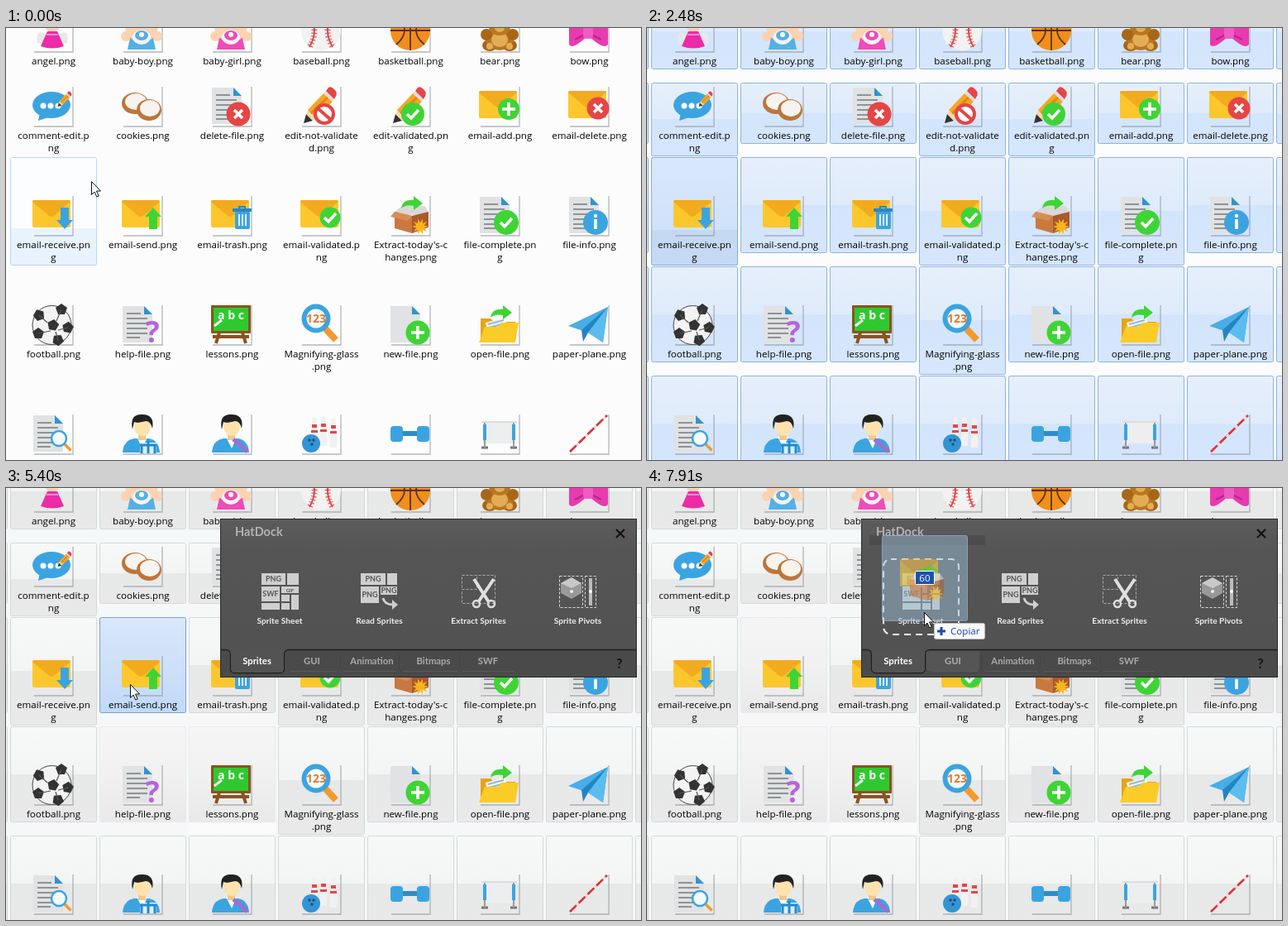
Recreate the animation shown at these times as an HTML page. Size 768 by 522 pixels, loop 8000 ms.

```html
<!DOCTYPE html>
<html lang="es">
<head>
<meta charset="utf-8">
<title>Sprite selection</title>
<style>
  html, body { margin: 0; width: 100%; height: 100%; overflow: hidden; background: #fcfcfc; }
  svg { display: block; width: 768px; height: 522px; }
  .label { font: 11.6px "Open Sans", "Noto Sans", sans-serif; text-anchor: middle; fill: #000; }
  .tip { font: 11.6px "Open Sans", "Noto Sans", sans-serif; fill: #575757; }
  .ui { font: 700 10.2px Lato, sans-serif; text-anchor: middle; fill: #eee; }
  .tab { font-size: 11.3px; fill: #aaa; }
  .chip { font: 700 9px Lato, sans-serif; text-anchor: middle; fill: #555; }
  .mark { font: 700 14px "Open Sans", sans-serif; text-anchor: middle; }
</style>
</head>
<body>
<svg id="stage" viewBox="0 0 768 522"></svg>
<script>
const LOOP = 8000;
const COLS = [0, 1, 2, 3, 4, 5, 6];
const BLUE = '#3ba4e0', GREEN = '#3fd435', RED = '#e64545', GREY = '#cfcfcf';

// Markup helpers
const fill = (d, color, extra = '') => `<path d="${d}" fill="${color}" ${extra}/>`;
const line = (d, color, w = 1, extra = '') =>
  `<path d="${d}" fill="none" stroke="${color}" stroke-width="${w}" ${extra}/>`;
const box = (x, y, w, h, color, r = 0, extra = '') =>
  `<rect x="${x}" y="${y}" width="${w}" height="${h}" rx="${r}" fill="${color}" ${extra}/>`;
const oval = (x, y, rx, color, ry = rx, extra = '') =>
  `<ellipse cx="${x}" cy="${y}" rx="${rx}" ry="${ry}" fill="${color}" ${extra}/>`;
const text = (x, y, str, cls, extra = '') => `<text x="${x}" y="${y}" class="${cls}" ${extra}>${str}</text>`;
const group = (x, y, body, extra = '', scale = 1) =>
  `<g transform="translate(${x} ${y}) scale(${scale})" ${extra}>${body}</g>`;
const during = (spans, body) => `<g data-t="${spans}">${body}</g>`;
const gradient = (id, ...stops) => `<linearGradient id="${id}" x2="0" y2="1">` +
  stops.map(([at, c]) => `<stop offset="${at}" stop-color="${c}"/>`).join('') + '</linearGradient>';

// Icon parts
const badge = (x, y, r, color, mark) => group(x, y, oval(0, 0, r, color) + line(mark, '#fff', 3.6));
const CHECK = 'M-7 0L-2 5L7-5', CROSS = 'M-5-5L5 5M5-5L-5 5', PLUS = 'M-8 0H8M0-8V8';
const page = fill('M1 2H27L37 12V46H1Z', '#e0e2e3') + fill('M27 2L37 12H27Z', '#3093cf');
const doc = page + line('M6 11H23M6 17H31M6 23H31M6 29H31M6 35H31M6 40H22', '#8f9395', 2);
const mail = box(0, 6, 46, 33, '#fcc72c', 2) +
  fill('M0 8Q0 6 2 6H44Q46 6 46 8L27 24Q23 28 19 24Z', '#f2ab1f');
const pencil = fill('M4 45L7 34L15 42Z', '#333') + fill('M7 34L10 28L20 38L15 42Z', '#f7d7a8') +
  fill('M9 29L28 9L39 19L19 39Z', '#f6a623') + line('M13 33L33 14', '#e0851a', 3) +
  fill('M28 9L31 6L41 16L39 19Z', '#ddd') + fill('M31 6L34 2Q37 0 41 4Q46 9 42 14L41 16Z', RED);
const arrow = (x, y, color, turn) => group(x, y,
  fill('M-5-13H5V2H10L0 13L-10 2H-5Z', color, `transform="rotate(${turn})"`));
const curvedArrow = fill('M14 16Q16 4 29 6V1L40 10L29 18V13Q19 11 14 16Z', GREEN);
const burst = color => fill(Array.from({ length: 20 }, (_, i) => {
  const r = i % 2 ? 5 : 10, a = i * Math.PI / 10;
  return (i ? 'L' : 'M') + (r * Math.cos(a)).toFixed(1) + ' ' + (r * Math.sin(a)).toFixed(1);
}).join('') + 'Z', color);
const crate = fill('M6 20L15 13H42L47 20L42 24H8Z', '#d8d8d8') + fill('M6 20L27 25V46L6 40Z', '#c9783f') +
  fill('M27 25L47 20V39L27 46Z', '#a95b2b') + fill('M6 20L1 26L22 31L27 25Z', '#d98d55') +
  curvedArrow + group(37, 38, burst('#fbb51c'));
const lens = (x, y, r) => line(`M${x + r * .7} ${y + r * .7}l${r * .9} ${r * .9}`, '#f29a2e', r * .4) +
  oval(x, y, r, '#f4fbff', r, `stroke="${BLUE}" stroke-width="${r * .28}"`);
const baby = color => oval(5, 30, 6, '#fbd3b2') + oval(43, 30, 6, '#fbd3b2') +
  fill('M10 32H38L41 46H7Z', color) + oval(24, 17, 20, '#fbd3b2') +
  oval(24, 31, 11, '#f4f4f4', 9) + oval(24, 29, 8, color, 6) + oval(24, 28, 3, '#fff');
const person = fill('M1 47Q2 32 15 30H33Q45 32 46 47Z', BLUE) + fill('M18 28H31L25 42Z', '#fff') +
  box(20, 23, 9, 9, '#edc98d') + oval(25, 15, 10, '#fde2ae', 12) +
  fill('M13 19Q9 0 25 1Q40 1 37 18Q35 9 29 9Q18 12 15 10Z', '#222');
const pin = (x, y) => group(x, y, fill('M-3 0Q0-4 3 0Q3 7 2 11Q6 23 4 34H-4Q-6 23-2 11Q-3 7-3 0Z', '#f1f1f1') +
  box(-3, 7, 6, 4, RED) + box(-4, 14, 8, 3, RED));
const patch = (x, y, a) => fill('M0-7L7-2L4 6H-4L-7-2Z', '#333', `transform="translate(${x} ${y}) rotate(${a})"`);

const icons = [
  [
    fill('M17 28Q3 20 6 38L17 40M31 28Q45 20 42 38L31 40', '#e8e8e8') + oval(24, 16, 9, '#fbd3b2') +
      fill('M18 24H30L38 42Q24 47 10 42Z', '#ec2ba6') + line('M17 28H31', '#f58bd0', 2),
    baby('#55b0e4'),
    baby('#ee4cb8'),
    oval(25, 23, 24, '#f2f2f2') + line('M11 3Q23 23 11 43M39 3Q27 23 39 43', RED, 2) +
      line('M11 3Q23 23 11 43M39 3Q27 23 39 43', RED, 7, 'stroke-dasharray="1 3"'),
    oval(25, 23, 24, '#f18e1c') + line('M25 0V47M1 23H49M8 6Q28 23 8 40M42 6Q22 23 42 40', '#5a3310', 1.8),
    oval(13, 41, 9, '#a76717', 7) + oval(37, 41, 9, '#a76717', 7) + oval(25, 32, 17, '#b9771f', 15) +
      oval(25, 34, 10, '#e3ad55', 9) + oval(9, 28, 7, '#a76717') + oval(41, 28, 7, '#a76717') +
      oval(25, 15, 14, '#b9771f') + oval(25, 20, 6, '#e3ad55', 5) +
      oval(13, 42, 4, '#e3ad55') + oval(37, 42, 4, '#e3ad55'),
    fill('M24 24Q6 8 1 12V40Q5 47 24 29Q43 47 48 40V12Q42 8 24 24Z', '#e83bb0') +
      line('M8 34L20 28M40 34L28 28', '#bd2389', 2) + box(18, 18, 12, 15, '#f25ac4', 4)
  ],
  [
    oval(23, 23, 23, BLUE, 16) + fill('M9 32L7 42L22 37Z', BLUE) +
      [13, 22, 31].map(x => oval(x, 24, 3.5, '#fff')).join('') + group(29, 6, pencil, '', .42),
    oval(16, 21, 16, '#bd753c', 13) + oval(17, 19, 13, '#f7f4ef', 10) +
      oval(33, 29, 15, '#bd753c', 13) + oval(34, 27, 12, '#f7f4ef', 10),
    doc + badge(33, 34, 14.5, RED, CROSS),
    pencil + oval(29, 34, 11, '#fff', 11, `stroke="${RED}" stroke-width="4"`) + line('M21 27L37 41', RED, 4),
    pencil + badge(28, 34, 14, GREEN, CHECK),
    mail + badge(36, 28, 13, GREEN, PLUS),
    mail + badge(36, 27, 13.5, RED, CROSS)
  ],
  [
    mail + arrow(39, 28, BLUE, 0),
    mail + arrow(38, 28, GREEN, 180),
    mail + box(29, 19, 18, 22, BLUE, 2) + box(26, 16, 23, 4, '#2588c9', 1) +
      line('M34 16V14H41V16', '#2588c9', 2) + line('M34 23V37M38 23V37M42 23V37', '#e4f4ff', 2),
    mail + badge(36, 27, 12.5, GREEN, CHECK),
    crate,
    doc + badge(33, 33, 15, GREEN, CHECK),
    doc + oval(33, 33, 15, BLUE) + oval(33, 25, 2.2, '#fff') + line('M33 29V41', '#fff', 3.6)
  ],
  [
    oval(23.5, 25, 23.5, '#f3f3f3', 23.5, 'stroke="#444"') +
      patch(25, 25, 10) + patch(8, 13, 50) + patch(35, 6, 0) + patch(43, 28, 80) + patch(31, 43, 30) + patch(7, 35, 0) +
      line('M18 22L8 13M29 20L35 6M31 31L43 28M22 32L7 35M28 33L31 43', '#555', 1.2),
    doc + text(37, 46, '?', 'mark', 'style="font-size:36px" fill="#b565d8"'),
    line('M10 34L6 47M38 34L42 47M2 39H46', '#8a5320', 4) + box(0, 1, 48, 34, '#8a5320', 1) +
      box(3, 4, 42, 28, '#2fc92f') + text(24, 18, 'a b c', 'mark', 'fill="#fff"') +
      line('M4 26L13 19', '#f4f4f4', 3),
    line('M30 29L43 43', '#f29a2e', 8) + oval(19, 17, 14.5, '#f4fbff', 14.5, `stroke="${BLUE}" stroke-width="6"`) +
      text(19, 22, '123', 'mark', 'fill="#e8792b"'),
    page + badge(34, 34, 14.5, GREEN, PLUS),
    fill('M2 17H14L18 21H44V45H2Z', '#e4a41b') + fill('M8 22L32 16L36 36L12 42Z', '#f6f6f6') +
      line('M11 24L30 19M12 28L31 23', '#8fb8d8', 2) + fill('M0 46L7 27H23L27 22H48L44 46Z', '#fbcb27') +
      curvedArrow,
    fill('M0 26L48 3L42 46L24 34Z', '#48aee8') + fill('M48 3L16 31L18 45L24 34Z', '#2485c3') +
      fill('M48 3L24 34L42 46Z', '#5bbcf0')
  ],
  [
    doc + lens(32, 30, 9),
    person + box(22, 35, 20, 13, '#d9f0ff') + line('M32 33V48M22 38H42M24 39V48M40 39V48', '#238acb', 3),
    person + line('M27 31L44 46', '#a56bd0', 5),
    pin(17, 6) + pin(28, 5) + pin(40, 7) + oval(13, 36, 11, '#3394d4') +
      oval(11, 32, 1.7, '#174e79') + oval(16, 32, 1.7, '#174e79') + oval(14, 37, 1.7, '#174e79'),
    box(10, 21, 28, 6, '#2c8dca') + box(1, 15, 15, 19, BLUE, 4) + box(33, 15, 15, 19, BLUE, 4),
    box(5, 11, 38, 25, '#eceeef') + line('M3 41H11M38 41H46', '#777', 3) +
      line('M7 11V41M42 11V41', '#999', 2) + line('M7 13V32M42 13V32', BLUE, 4) + line('M3 10H46', '#ddd', 2),
    line('M2 46L47 2', '#e4dada', 2.6) + line('M2 46L47 2', '#dc3434', 2.6, 'stroke-dasharray="11 4"')
  ]
];

const labels = [
  'angel.png,baby-boy.png,baby-girl.png,baseball.png,basketball.png,bear.png,bow.png',
  'comment-edit.p|ng,cookies.png,delete-file.png,edit-not-validate|d.png,edit-validated.pn|g,email-add.png,email-delete.png',
  'email-receive.pn|g,email-send.png,email-trash.png,email-validated.p|ng,Extract-today\'s-c|hanges.png,file-complete.pn|g,file-info.png',
  'football.png,help-file.png,lessons.png,Magnifying-glass|.png,new-file.png,open-file.png,paper-plane.png',
  'task-file.png,User-bill.png,User-bill.png,Sports-bowling,Sports-dumbbell,Sports-hurdles,Sports-javelin'
].map(row => row.split(',').map(name => name.split('|')));
const iconTops = [-20, 70, 202, 334, 466];
const cellTops = [-41, 67, 157, 289, 421];

function cell(col, row, paint, stroke, extra = '') {
  const lines = (labels[row][col] || ['']).length;
  const top = cellTops[row] - .5, bottom = iconTops[row] + 54.5 + 15 * lines;
  return box(5.5 + 108 * col, top, 104, bottom - top, paint, 2, `stroke="${stroke}" ${extra}`);
}
const allCells = (paint, stroke) =>
  cellTops.map((_, row) => [-1, ...COLS, 7].map(col => cell(col, row, paint, stroke)).join('')).join('');
const files = icons.map((row, r) => row.map((icon, c) => {
  const x = 32 + 108 * c, y = iconTops[r];
  return group(x, y, line('M2 49H49V1', '#8d9299', 1.3, 'opacity=".65"') + icon) +
    labels[r][c].map((part, i) => text(x + 25.5, y + 64 + 15 * i, part, 'label')).join('');
}).join('')).join('');

const defs = '<defs>' +
  gradient('hover', [0, '#fcfdff'], [.66, '#fafcff'], [.66, '#e9f3fd'], [1, '#e9f3fd']) +
  gradient('glow', [0, '#fbfdff'], [.38, '#f7fafe'], [.38, '#edf5fd'], [1, '#e9f3fd']) +
  gradient('active', [0, '#d9e7f8'], [.45, '#cfe1f8'], [1, '#c0daf9']) +
  gradient('blue', [0, '#e6effb'], [.5, '#dfebfb'], [.5, '#d3e5fc'], [1, '#d5e6fd']) +
  gradient('focus', [0, '#d9e8fc'], [.67, '#cfe2fb'], [.67, '#c4d8f2'], [1, '#c6daf5']) +
  gradient('grey', [0, '#f7f8f8'], [.5, '#f3f4f4'], [.5, '#e7e8e8'], [1, '#e9e9e9']) +
  gradient('faded', [0, '#f5f5f5'], [.5, '#f1f1f1'], [1, '#e9e9e9']) +
  gradient('tipFill', [0, '#fff'], [1, '#e4e5f0']) +
  gradient('panel', [0, '#5c5c5c'], [.2, '#555'], [1, '#515151']) + '</defs>';

const hot = (col, row) => cell(col, row, 'url(#active)', '#7da2ce');
const faded = (col, row) => cell(col, row, 'url(#faded)', '#e9eaea');
const sendHover = opacity => cell(1, 2, 'url(#glow)', '#b8d6fb', `opacity="${opacity}"`);
const highlights =
  during('0-150', cell(0, 2, 'url(#hover)', '#b8d6fb')) +
  during('150-1940', hot(0, 2)) +
  during('420-550', sendHover(.4)) + during('550-680', sendHover(.7)) + during('680-1940', sendHover(1)) +
  during('1940-4200', cell(0, 2, 'url(#focus)', '#84acdd')) +
  during('4770-8000', faded(2, 3) + box(221, 405, 105, 13, '#fbfbfb')) +
  during('5160-8000', faded(1, 3)) + during('5670-8000', faded(1, 2)) +
  during('1940-2330 5160-5670', hot(1, 2)) +
  during('2330-2480 4770-5160', hot(1, 3)) + during('4650-4770', hot(2, 3));

const tooltip = opacity => `<g opacity="${opacity}">` + box(152, 251, 179, 50, '#000', 3, 'opacity=".3"') +
  box(149.5, 248.5, 178, 49, 'url(#tipFill)', 2, 'stroke="#767676"') +
  ['Tipo de elemento: Imagen PNG', 'Dimensiones: 48 x 48', 'Tamaño: 1,58 KB']
    .map((s, i) => text(155, 262 + 15 * i, s, 'tip')).join('') + '</g>';

const chip = (x, y, w, h, str = '') => box(x, y, w, h, GREY) +
  (str && text(x + w / 2, y + h / 2 + 3.3, str, 'chip', h < 9 ? 'style="font-size:6px"' : ''));
const dashes = 'stroke-dasharray="3 2"';
const tools =
  chip(309, 103, 29, 14, 'PNG') + chip(340, 103, 14, 14) + chip(309, 119, 22, 18, 'SWF') +
  chip(333, 119, 21, 8, 'GIF') + chip(309, 139, 22, 8) + chip(333, 129, 10, 8) + chip(345, 129, 9, 18) + chip(333, 139, 10, 8) +
  chip(429, 103, 30, 14, 'PNG') + chip(461, 103, 12, 14) + chip(429, 119, 22, 20, 'PNG') + chip(453, 119, 20, 10, 'PNG') +
  line('M456 133Q458 141 468 141', GREY, 3) + fill('M467 135L474 141L467 147Z', GREY) +
  line('M551.5 105.5H569.5V122.5H551.5ZM571.5 105.5H591.5V139.5H551.5V124', '#aaa', 1, dashes) +
  line('M566 110L584 138M590 110L571 138', '#e0e0e0', 4) +
  oval(569, 140, 4, 'none', 4, 'stroke="#ddd" stroke-width="2.5"') + oval(587, 140, 4, 'none', 4, 'stroke="#ddd" stroke-width="2.5"') +
  line('M669.5 106.5H697.5V144.5H669.5ZM700.5 106.5H713.5V144.5H700.5Z', '#ddd', 1, dashes) +
  fill('M671 115L684 108L696 115V127L684 134L671 127Z', '#999') + fill('M671 115L684 108L696 115L684 121Z', '#c8c8c8') +
  oval(684, 125, 2, '#eee') + line('M707 109V142', '#bbb', 4) + oval(707, 125, 2, '#fff');
const panel =
  box(259.5, 37.5, 503, 191, 'url(#panel)', 0, 'stroke="#2b2b2b"') + box(260, 195, 502, 33, '#4a4a4a') +
  line('M260 195.5H266Q271.5 195.5 271.5 201V218Q271.5 223.5 277 223.5H331Q336.5 223.5 336.5 218V201Q336.5 195.5 342 195.5H762', '#1f1f1f', 1.3) +
  fill('M267 195Q272 195 272 201V218Q272 223 277 223H331Q336 223 336 218V201Q336 195 341 195Z', '#535353') +
  line('M344 221.5H400M408 221.5H472M480 221.5H546M552 221.5H614', '#5a5a5a') +
  line('M404.5 200V219M475.5 200V219M548.5 200V219', '#444') +
  text(277, 58, 'HatDock', 'ui', 'style="font-size:14.5px;text-anchor:start;fill:#b3b3b3"') +
  line('M738 50L748 60M748 50L738 60', '#111', 2.2) +
  text(742, 218, '?', 'ui', 'style="font-size:17px;fill:#151515"') +
  ['Sprite Sheet', 'Read Sprites', 'Extract Sprites', 'Sprite Pivots']
    .map((s, i) => text(331 + 120 * i + (i ? .5 : 0), 164, s, 'ui')).join('') +
  text(303.5, 213, 'Sprites', 'ui tab', 'style="fill:#fff"') +
  [[370, 'GUI'], [442.5, 'Animation'], [517, 'Bitmaps'], [583, 'SWF']]
    .map(([x, s]) => text(x, 213, s, 'ui tab')).join('') + tools +
  during('6630-8000', box(338, 197, 64, 24, '#fff', 3, 'opacity=".06"')) +
  during('6940-8000', box(269, 57, 140, 12, '#000', 0, 'opacity=".13"'));

const ghost = box(-1, 0, 106, 106, '#456', 3, 'opacity=".12"') +
  box(.5, .5, 103, 103, '#a9cfe8', 2, 'fill-opacity=".43" stroke="#9cc4dd" stroke-opacity=".6"') +
  group(22, 23, mail, 'opacity=".55"') + group(28, 33, crate, 'opacity=".6"') +
  box(40.5, 43.5, 23, 16, '#1b50b5', 1, 'stroke="#fff"') +
  text(52, 56, '60', 'tip', 'style="fill:#fff;text-anchor:middle"');
const pointer = fill('M-.5.5V16.5L3 13L5.8 19L8.2 18L5.5 12H10.5Z', '#fff', 'stroke="#111"') +
  during('6480-8000', box(11.5, 13.5, 61, 19, '#fbfbfd', 2, 'stroke="#bbb"') + line('M15 23H25M20 18V28', '#174ea6', 3) +
    text(31, 27, 'Copiar', 'tip', 'style="fill:#1440a0"'));

const stage = document.getElementById('stage');
stage.innerHTML = defs + box(0, 0, 768, 522, '#fcfcfc') +
  during('1940-4200', allCells('url(#blue)', '#8fb3e0')) +
  during('4200-8000', box(0, 0, 768, 522, '#f5f8f8') + allCells('url(#grey)', '#d7d8d8')) +
  highlights + files +
  during('1540-1700 1940-2060', tooltip(.72)) + during('1700-1940', tooltip(1)) + during('2060-2180', tooltip(.3)) +
  during('4200-8000', panel) +
  during('6630-8000', box(286, 86, 91, 91, 'none', 9, 'id="ants" stroke="#f4f4f4" stroke-width="2" stroke-dasharray="8 6"')) +
  `<g id="ghost">${ghost}</g><g id="pointer">${pointer}</g>`;

// Each entry: start time, then x and y; no position means hidden.
const pointerTrack = [[0, 104, 185], [150, 112, 196], [420, 125, 210], [550, 140, 224], [680, 150, 230],
  [2330, 170, 394], [2480], [4650, 262, 398], [4770, 215, 370], [4890, 185, 345], [5040, 160, 290],
  [5160, 151, 250], [5280, 151, 240], [5400, 151, 237], [5550, 170, 228], [5670, 222, 224], [5820],
  [6070, 227, 221], [6210, 240, 221], [6330, 244, 221], [6480, 265, 215], [6630, 310, 178],
  [6790, 321, 167], [6940, 335, 150], [7090, 336, 150]];
const ghostTrack = [[0], [5550, 118, 135], [5670, 171, 131], [5820, 174, 128], [6210, 180, 128], [6330, 192, 128],
  [6480, 213, 122], [6630, 258, 85], [6790, 269, 74], [6940, 283, 57], [7090, 284, 57]];

const timed = [...stage.querySelectorAll('[data-t]')].map(el => ({
  el, spans: el.dataset.t.split(' ').map(span => span.split('-').map(Number))
}));
const show = (el, on) => { el.style.display = on ? '' : 'none'; };
function place(id, track, t) {
  const [, x, y] = track.findLast(entry => entry[0] <= t);
  const el = document.getElementById(id);
  show(el, x !== undefined);
  if (x !== undefined) el.setAttribute('transform', `translate(${x} ${y})`);
}
function render(now) {
  const t = now % LOOP;
  for (const { el, spans } of timed) show(el, spans.some(([from, to]) => t >= from && t < to));
  place('pointer', pointerTrack, t);
  place('ghost', ghostTrack, t);
  document.getElementById('ants').setAttribute('stroke-dashoffset', -3 * Math.floor((t - 6630) / 140));
}
let start;
function frame(now) {
  start ??= now;
  render(now - start);
  requestAnimationFrame(frame);
}
render(0);
requestAnimationFrame(frame);
</script>
</body>
</html>
```
